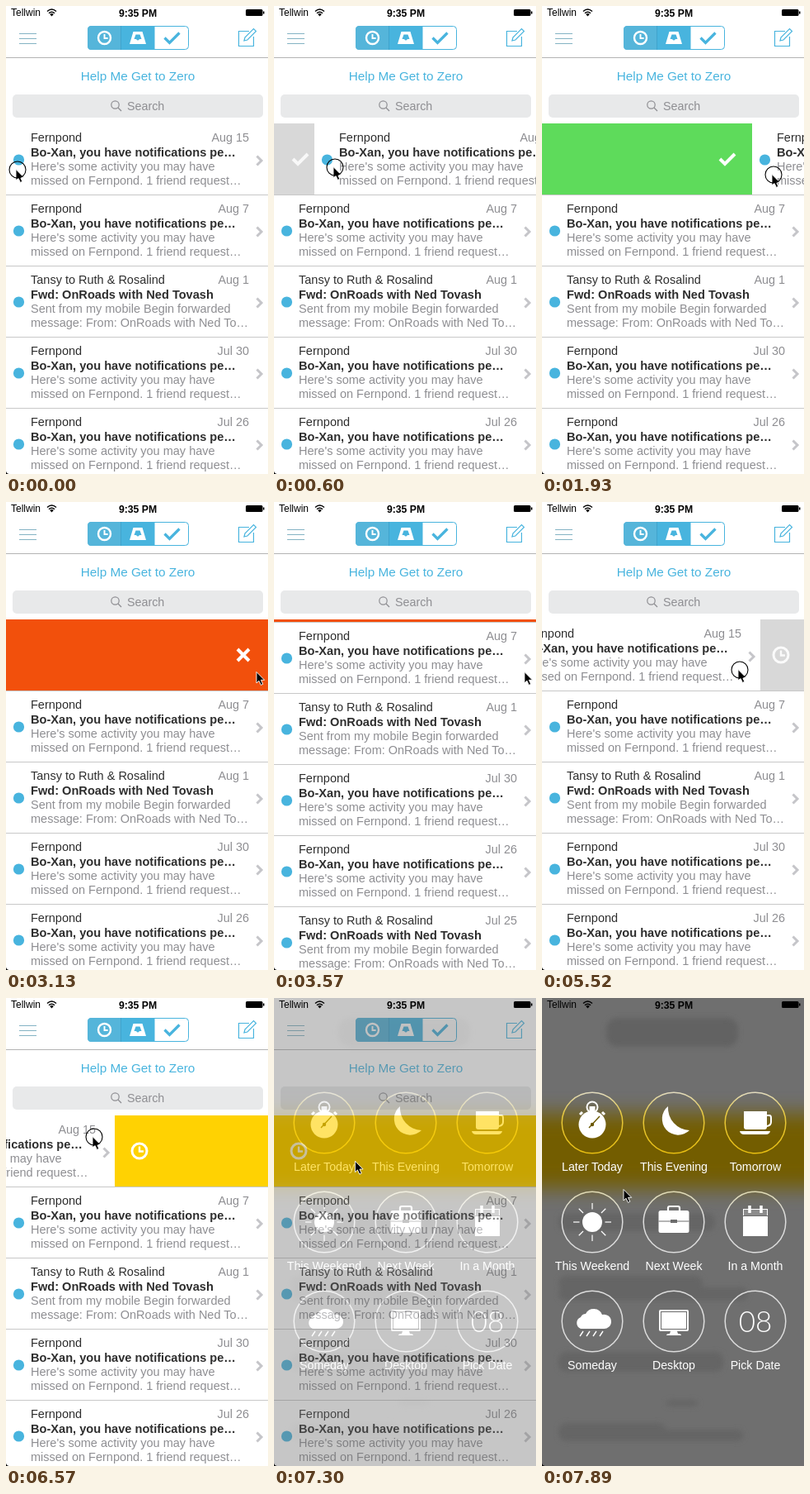
An HTML page that plays this animation: 318 by 566 pixels, repeating every 8 s.

```html
<!DOCTYPE html>
<html lang="en">
<head>
<meta charset="utf-8">
<title>Swipe mail</title>
<style>
html, body { margin: 0; width: 100%; height: 100%; overflow: hidden; background: #fff; }
svg { display: block; font: 14.5px "Liberation Sans", Arial, sans-serif; }
.line { fill: none; stroke-linecap: butt; }
.bold { font-weight: bold; }
</style>
</head>
<body>
<svg id="stage" width="318" height="566" viewBox="0 0 318 566"></svg>
<script>
const FRAME = 148.87, LOOP = 8000, ROW = 86, TOP = 142;
const BLUE = '#48b4de', GREY = '#8e8e92', INK = '#2e2e2e';

const text = (x, y, str, fill, size = 14.5, extra = '') =>
  `<text x="${x}" y="${y}" fill="${fill}" font-size="${size}" ${extra}>${str}</text>`;
const line = (d, stroke, width = 1, extra = '') =>
  `<path class="line" d="${d}" stroke="${stroke}" stroke-width="${width}" ${extra}/>`;
const rect = (x, y, w, h, fill, extra = '') =>
  `<rect x="${x}" y="${y}" width="${w}" height="${h}" fill="${fill}" ${extra}/>`;
const circle = (x, y, r, fill, extra = '') =>
  `<circle cx="${x}" cy="${y}" r="${r}" fill="${fill}" ${extra}/>`;

const clock = (stroke, r, w) =>
  circle(0, 0, r, 'none', `stroke="${stroke}" stroke-width="${w}"`) +
  line(`M0 ${-r * .6}V.5H${r * .55}`, stroke, w * .8);
const check = (stroke, w) => line('M-9 0L-3 6L9 -6', stroke, w);

// Mail list
const social = ['Fernpond', 'Bo-Xan, you have notifications pe…',
  "Here's some activity you may have", 'missed on Fernpond. 1 friend request…'];
const forward = ['Tansy to Ruth &amp; Rosalind', 'Fwd: OnRoads with Ned Tovash',
  'Sent from my mobile Begin forwarded', 'message: From: OnRoads with Ned To…'];

function mail(y, date, [sender, subject, first, second]) {
  return `<g transform="translate(0 ${y})">` +
    rect(0, 0, 318, ROW, '#fff') +
    circle(15.5, 44, 6.6, BLUE) +
    text(30, 22, sender, INK) +
    text(295, 22, date, GREY, 14.4, 'text-anchor="end"') +
    text(30, 40, subject, INK, 14.6, 'class="bold"') +
    text(30, 57, first, GREY) +
    text(30, 74, second, GREY) +
    line('M304.5 39.5L310 45L304.5 50.5', '#c5c5c9', 3) + '</g>';
}
const rest = [['Aug 7', social], ['Aug 1', forward], ['Jul 30', social],
  ['Jul 26', social], ['Jul 25', forward]];
const restRows = rest.map(([date, body], i) => {
  const y = TOP + ROW * (i + 1);
  return mail(y, date, body) + line(`M0 ${y + .5}H318`, '#c8c8c8');
}).join('');

const statusBar =
  text(6, 12, 'Tellwin', '#000', 12) +
  line('M50 6.5Q55.5 1.5 61 6.5M52 8.8Q55.5 5.6 59 8.8', '#000', 1.5) +
  '<path d="M53.2 10Q55.5 8 57.8 10L55.5 12.4Z"/>' +
  text(160, 12.5, '9:35 PM', '#000', 12.2, 'class="bold" text-anchor="middle"') +
  rect(291, 4, 20.5, 8, '#000', 'rx="1.5"') + rect(312, 6.5, 1.5, 3, '#000');

const header = rect(0, 0, 318, TOP, '#fff') + statusBar +
  line('M16 33.5H37M16 39.5H37M16 45.5H37', '#84b3c4') +
  rect(99.5, 24.5, 122, 28, '#fff', `rx="4" stroke="${BLUE}"`) +
  '<path d="M103.500 24H140V53H103.500Q99 53 99 48.500V28.500Q99 24 103.500 24Z" fill="#55b5da"/>' +
  rect(140, 24, 40.5, 29, BLUE) +
  line('M139.5 24V53', '#3fa4cd') +
  `<g transform="translate(119.500 38.500)">${clock('#fff', 7.5, 2.4)}</g>` +
  '<path d="M154.500 31H165.500L170 46H150ZM157.500 34.500L155.500 40H158Q160 43 162 40H164.500L162.500 34.500Z" fill="#fff" fill-rule="evenodd"/>' +
  `<g transform="translate(201.500 38.500)">${check(BLUE, 3.2)}</g>` +
  line('M295 30.5H282.5V48.5H300.5V37M289 42L290 38L300.5 27.5L303.5 30.5L293 41Z', BLUE, 1.2) +
  line('M0 62.5H318', '#b4b4b4') +
  text(160, 89.5, 'Help Me Get to Zero', BLUE, 15.3, 'text-anchor="middle"') +
  rect(8, 107, 304, 28, '#e8e9ea', 'rx="5"') +
  circle(132.5, 119.5, 4.7, 'none', `stroke="${GREY}" stroke-width="1.2"`) +
  line('M136 123L140 127', GREY, 1.3) +
  text(147, 126, 'Search', GREY, 14.3);

// Snooze menu icons, each around its own centre
const W = '#fff', D = '#6c6c6c';
const rays = Array.from({ length: 8 }, (_, i) =>
  line('M0 -15.5V-23', W, 1.2, `transform="rotate(${i * 45})"`)).join('');
const icons = {
  'Later Today': circle(0, 2, 16.5, W) +
    circle(0, -19, 6.5, 'none', 'stroke="#fff" stroke-width="2"') +
    rect(-3.5, -20, 7, 6, W) + line('M12 -13L15 -10M-12 -13L-15 -10', W, 3) +
    line('M-4 6L9 -8', '#6b5800', 1.4) + circle(0, 2, 2.2, '#6b5800'),
  'This Evening': '<path d="M-7 -20A19.500 19.500 0 1 0 19 9A27 27 0 0 1 -7 -20Z" fill="#fff"/>',
  'Tomorrow': '<path d="M-14 -14H14V5Q14 8 11 8H-11Q-14 8 -14 5Z" fill="#fff"/>' +
    line('M14 -9H17Q19 -9 19 -6V-1Q19 3 14 4', W, 2) +
    '<path d="M-19 10H18Q17 14 13 14H-14Q-18 14 -19 10Z" fill="#fff"/>',
  'This Weekend': circle(0, 0, 12, W) + rays,
  'Next Week': rect(-18.5, -14, 37, 27, W, 'rx="2.500"') +
    line('M-7 -14V-17Q-7 -19 -5 -19H5Q7 -19 7 -17V-14', W, 2.2) +
    line('M-18.5 -1H-4M4 -1H18.5', D) + rect(-4, -3, 8, 4, D),
  'In a Month': rect(-15, -16, 30, 33, W) + line('M-15 -7.5H15', D) +
    rect(-14, -15, 28, 7, '#8c8c8c') +
    line('M-7 -20V-11M7 -20V-11', W, 3.5),
  'Someday': '<path d="M-14 9A7.500 7.500 0 0 1 -14 -5A7 7 0 0 1 -8 -9A11 11 0 0 1 12 -8A8.700 8.700 0 1 1 13 9Z" fill="#fff"/>' +
    [-11, -3, 5, 13].map(x => line(`M${x} 12L${x - 4} 18`, W, 1.4)).join(''),
  'Desktop': rect(-18, -14, 36, 26, W, 'rx="2"') +
    rect(-15.5, -11.5, 31, 21, 'none', `stroke="${D}"`) +
    '<path d="M-4 12H4L5 15Q9 15 9 17H-9Q-9 15 -5 15Z" fill="#fff"/>',
  'Pick Date': text(0, 13, '08', W, 35,
    'text-anchor="middle" style="font-family:Lato,sans-serif;font-weight:300"')
};
const menu = Object.entries(icons).map(([label, icon], i) => {
  const x = 61 + i % 3 * 99, y = 151 + Math.floor(i / 3) * 120;
  return circle(x, y, 36.8, 'none', 'stroke="url(#ring)" stroke-width="1.5"') +
    `<g transform="translate(${x} ${y})">${icon}</g>` +
    text(x, y + 58, label, W, 14.2, 'text-anchor="middle"');
}).join('');

const blobs = [[20, 260, 190, 22], [20, 336, 175, 18], [20, 350, 230, 16], [20, 428, 200, 24],
  [20, 514, 130, 22], [45, 522, 200, 14], [150, 486, 40, 8]]
  .map(([x, y, w, h]) => rect(x, y, w, h, '#656565', 'rx="9"')).join('');
const overlay = rect(0, 0, 318, 566, '#6f6f6f') +
  `<g filter="url(#soft)">${rect(78, 24, 160, 35, '#626262', 'rx="14"')}${blobs}</g>` +
  `<g filter="url(#wide)">${rect(-60, 140, 440, 90, '#735d00')}</g>` +
  statusBar + menu;

const stops = [[114, '#e2dcc0'], [140, '#e6c840'], [188, '#e8be10'], [232, '#e0dab0'], [262, '#dcdcdc']]
  .map(([y, color]) => `<stop offset="${y / 566}" stop-color="${color}"/>`).join('');

const stage = document.getElementById('stage');
stage.innerHTML = `<defs>
    <linearGradient id="ring" gradientUnits="userSpaceOnUse" x1="0" y1="0" x2="0" y2="566">${stops}</linearGradient>
    <filter id="soft"><feGaussianBlur stdDeviation="3"/></filter>
    <filter id="wide" x="-20%" y="-80%" width="140%" height="260%"><feGaussianBlur stdDeviation="12"/></filter>
  </defs>` +
  rect(0, 0, 318, 566, '#fff') +
  rect(0, TOP, 318, ROW, '#d8d8d8', 'id="action"') +
  `<g id="check">${check(W, 4)}</g>
  <g id="cross">${line('M-7 -7L7 7M7 -7L-7 7', W, 4)}</g>
  <g id="clock">${clock(W, 9, 3)}</g>
  <g id="row">${mail(TOP, 'Aug 15', social)}</g>
  <g id="list">${restRows}</g>${header}
  <g id="overlay">${overlay}</g>
  <path d="M0 562.500Q.5 565.500 3.500 566H0Z"/>
  <g id="pointer">
    <path d="M-2 -.5V13L1 10.200L3.400 15.400L5.800 14.300L3.500 9.300H7.700Z" stroke="#fff" stroke-width=".9"/>
    ${circle(0, 0, 10, 'none', 'id="touch" stroke="#000" stroke-width="1.100"')}
  </g>`;
const part = id => document.getElementById(id);
const set = (id, name, value) => part(id).setAttribute(name, value);
const move = (id, x, y) => set(id, 'transform', `translate(${x} ${y})`);

// Tracks: [step, value, ...], linear between the keys
const offsetKeys = [[0, 0], [1, 0], [4, 49], [13, 255], [16, 293], [20, 293], [21, 318], [24, 318],
  [25, 0], [33, 0], [34, -8], [37, -53], [40, -125], [41, -125], [44, -186], [46, -198], [48, -318]];
const heightKeys = [[21, 86], [22, 62], [23, 26], [24, 3], [25, 86]];
const pointerKeys = [[0, 14, 198], [1, 20, 198], [4, 74, 195], [13, 281, 204], [16, 306, 206],
  [26, 306, 206], [27, 270, 196], [28, 200, 180], [29, 164, 175], [30, 200, 182], [31, 270, 198],
  [32, 304, 206], [33, 304, 206], [37, 240, 203], [40, 168, 196], [41, 168, 196], [44, 107, 168],
  [46, 100, 172], [53, 101, 232]];
const fadeKeys = [[47, 0], [52, .97], [53, 1]];

function at(keys, step) {
  const next = keys.findIndex(key => key[0] >= step);
  if (next < 0) return keys[keys.length - 1].slice(1);
  if (next === 0) return keys[0].slice(1);
  const a = keys[next - 1], b = keys[next], p = (step - a[0]) / (b[0] - a[0]);
  return a.slice(1).map((v, i) => v + (b[i + 1] - v) * p);
}

function actionColor(offset) {
  if (offset > 265) return '#f2500c';
  if (offset >= 60) return '#5edb5b';
  return offset <= -60 ? '#ffd202' : '#d8d8d8';
}

function draw(time) {
  const step = Math.floor((time % LOOP + 8) / FRAME);
  const [offset] = at(offsetKeys, step), [height] = at(heightKeys, step);
  const [x, y] = at(pointerKeys, step), [fade] = at(fadeKeys, step);
  const middle = TOP + height / 2;

  set('action', 'fill', actionColor(offset));
  const left = Math.max(32, offset - 30), right = Math.min(290, 348 + offset);
  move('check', left, middle);
  move('cross', left, middle);
  move('clock', right, middle);
  set('check', 'opacity', offset > 0 && offset <= 265 ? Math.min(1, offset / 60) : 0);
  set('cross', 'opacity', offset > 265 && height > 20 ? 1 : 0);
  set('clock', 'opacity', offset < 0 ? Math.min(1, -offset / 60) : 0);
  move('row', offset, 0);
  move('list', 0, height - ROW);
  move('pointer', x, y);
  set('touch', 'opacity', step < 21 || (step >= 32 && step < 46) ? 1 : 0);
  set('overlay', 'opacity', fade);
}

const start = performance.now();
function tick() {
  draw(performance.now() - start);
  requestAnimationFrame(tick);
}
tick();
</script>
</body>
</html>
```
